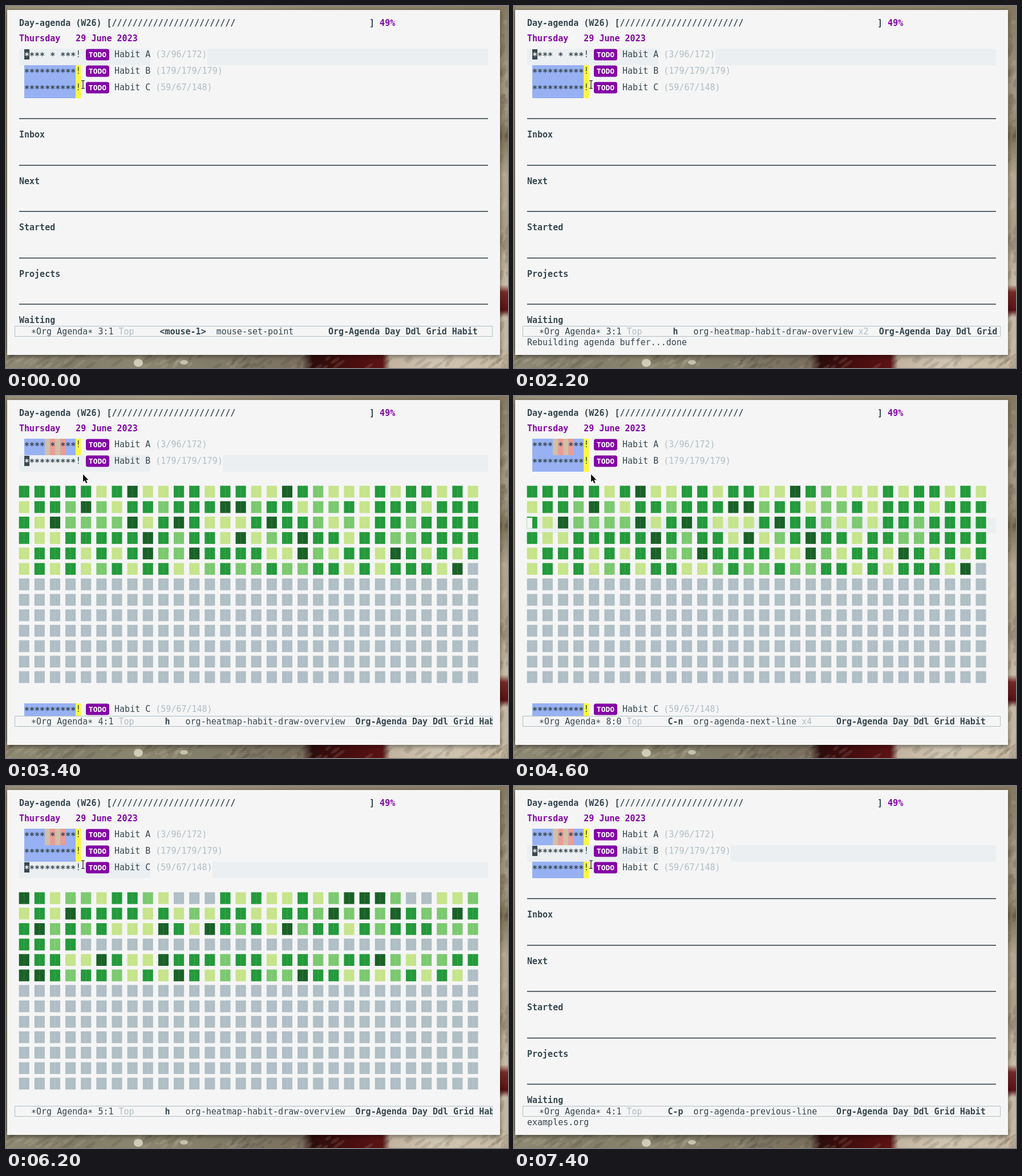
An HTML page with a canvas that plays this animation: 880 by 636 pixels, repeating every 8 s.

```html
<!DOCTYPE html>
<html lang="en">
<head>
<meta charset="utf-8">
<title>Habit heatmap agenda</title>
<style>
html, body { margin: 0; width: 100%; height: 100%; overflow: hidden; }
canvas { display: block; }
</style>
</head>
<body>
<canvas id="stage" width="880" height="636"></canvas>
<script>
const ctx = document.getElementById('stage').getContext('2d');
const LOOP = 8000, CW = 9.03, LEFT = 23;
const INK = '#37474f', FADED = '#b0bec5', PURPLE = '#8305a5', PAPER = '#f5f5f5',
  HILITE = '#ebeff1', BLUE = '#97b1f3', YELLOW = '#f8f83e', TAN = '#d0c0a6', SALMON = '#ec9c96';
const LEVELS = ['#c6e48b', '#7bc96f', '#239a3b', '#196127'];
const HEAT_SHIFT = 407, CELL = 27.13, ROW = 27.15;

// Empty days per habit: [row, first column, last column]
const habits = [
  { name: 'Habit A', stats: '(3/96/172)', stars: '**** * ***', seed: 11,
    gaps: [[1, 23, 23], [3, 15, 17], [5, 4, 4], [5, 23, 23], [5, 25, 25], [5, 29, 29]] },
  { name: 'Habit B', stats: '(179/179/179)', stars: '**********', seed: 29, gaps: [[5, 29, 29]] },
  { name: 'Habit C', stats: '(59/67/148)', stars: '**********', seed: 47,
    gaps: [[0, 10, 12], [0, 25, 26], [3, 4, 29], [5, 29, 29]] }
];

const DRAW = ['h', 'org-heatmap-habit-draw-overview'];
const NEXT = ['C-n', 'org-agenda-next-line'];
const PREV = ['C-p', 'org-agenda-previous-line'];
const CLICK = ['<mouse-1>', 'mouse-set-point'];
const DONE = 'Rebuilding agenda buffer...done', CATEGORY = 'examples.org';

// heat is the index of the habit whose heatmap is open, or -1
const step = (at, line, col, heat, command, count = 1, echo = '') =>
  ({ at, line, col, heat, command, count, echo });
const steps = [
  step(0, 3, 1, -1, CLICK),
  step(1400, 3, 1, 0, DRAW),
  step(2200, 3, 1, -1, DRAW, 2, DONE),
  step(2700, 4, 1, -1, NEXT, 1, CATEGORY),
  step(3400, 4, 1, 1, DRAW),
  step(4000, 5, 0, 1, NEXT),
  step(4100, 6, 0, 1, NEXT, 2),
  step(4400, 7, 0, 1, NEXT, 3),
  step(4600, 8, 0, 1, NEXT, 4),
  step(4700, 9, 0, 1, NEXT, 5),
  step(5100, 4, 1, -1, DRAW),
  step(5200, 4, 1, -1, DRAW, 1, DONE),
  step(5800, 5, 1, -1, NEXT, 1, CATEGORY),
  step(6200, 5, 1, 2, DRAW),
  step(7000, 5, 1, -1, DRAW, 2, DONE),
  step(7400, 4, 1, -1, PREV, 1, CATEGORY)
];

function rect(x, y, w, h, color) {
  ctx.fillStyle = color;
  ctx.fillRect(x, y, w, h);
}

function text(str, x, y, color = INK, weight = 'normal', size = 15) {
  ctx.font = `${weight} ${size}px "DejaVu Sans Mono", monospace`;
  ctx.fillStyle = color;
  ctx.fillText(str, x, y);
}

// Asterisks sit at mid-height, like operators
function stars(str, x, y, color = INK, weight = 'bold') {
  text(str, x, y + 3, color, weight);
}

function gradient(x, y, w, h, vertical, stops) {
  const g = vertical ? ctx.createLinearGradient(0, y, 0, y + h) : ctx.createLinearGradient(x, 0, x + w, 0);
  for (const [pos, color] of stops) g.addColorStop(pos, color);
  rect(x, y, w, h, g);
}

function blob(x, y, rx, ry, color, angle = 0) {
  ctx.fillStyle = color;
  ctx.beginPath();
  ctx.ellipse(x, y, rx, ry, angle, 0, 7);
  ctx.fill();
}

function random(seed) {
  return () => (seed = (seed * 16807) % 2147483647) / 2147483647;
}

function drawDesktop() {
  gradient(0, 0, 880, 14, false, [[0, '#9a917a'], [.3, '#a79d84'], [.6, '#92876f'], [1, '#877b62']]);
  gradient(0, 0, 3, 636, true, [[0, '#8f8770'], [1, '#7c7864']]);
  gradient(860, 0, 20, 636, true, [[0, '#85785f'], [.24, '#a39880'], [.36, '#7d7357'], [.47, '#b5a78f'],
    [.66, '#a99a82'], [.77, '#cabda8'], [.79, '#7a2c28'], [.84, '#5c1015'], [.86, '#c5b9a3'], [1, '#bfb39d']]);
  gradient(0, 606, 880, 30, false, [[0, '#8f8a74'], [.13, '#807c67'], [.26, '#8b866f'], [.45, '#7f7966'],
    [.59, '#7b6f5e'], [.61, '#2c0d0c'], [.67, '#430d0e'], [.75, '#5c1214'], [.765, '#c2b39f'], [.86, '#d0c5b2'], [1, '#c3b69f']]);
  // Loose brush strokes
  const next = random(4242);
  for (let i = 0; i < 160; i++) {
    const tone = next() < .5 ? 'rgba(235,225,200,.12)' : 'rgba(45,35,22,.12)';
    const along = next(), across = next(), size = 4 + next() * 10;
    if (i % 3) blob(along * 880, 612 + across * 24, size, 3, tone, -.6);
    else blob(864 + across * 16, along * 636, 4, size, tone, .3);
  }
  blob(232, 627, 8, 7, '#d1cdb9');
  blob(312, 626, 7, 4, '#c7c2ad');
  ctx.save();
  ctx.shadowColor = 'rgba(0,0,0,.5)';
  ctx.shadowBlur = 8;
  ctx.shadowOffsetY = 2;
  rect(2, 7, 864, 606, PAPER);
  ctx.restore();
}

function drawCursor(x, y, glyph = '') {
  rect(x, y + 1, CW, 18, INK);
  stars(glyph, x, y + 15, PAPER);
}

function drawHabit(habit, y, current) {
  const col = n => LEFT + n * CW;
  const statsX = col(26.5), statsEnd = statsX + habit.stats.length * CW;
  if (current) {
    rect(LEFT, y, 230, 29, HILITE);
    rect(statsEnd, y, 845 - statsEnd, 29, HILITE);
  } else {
    rect(col(1), y, 10 * CW, 29, BLUE);
    rect(col(11), y, CW, 29, YELLOW);
    if (habit === habits[0]) {
      [TAN, SALMON, TAN, SALMON].forEach((color, i) => rect(col(5 + i), y, CW, 29, color));
    }
  }
  stars(habit.stars, col(1), y + 15);
  text('!', col(11), y + 15);
  if (current) drawCursor(col(1), y, '*');
  ctx.fillStyle = PURPLE;
  ctx.beginPath();
  ctx.roundRect(140, y + 0.5, 41, 20, 3.5);
  ctx.fill();
  text('TODO', 144.8, y + 15, '#fff', 'bold', 13);
  text(habit.name, col(18.5), y + 15);
  text(habit.stats, statsX, y + 15, FADED);
}

function drawHeatmap(habit, top, activeRow) {
  const next = random(habit.seed * 7919);
  if (activeRow === -1) {
    rect(LEFT, top - 25, 822, 27, HILITE);
    drawCursor(LEFT, top - 25);
  }
  for (let row = 0; row < 13; row++) {
    const y = top + row * ROW;
    if (row === activeRow) rect(LEFT, y + 2, 822, 27, HILITE);
    for (let c = 0; c < 30; c++) {
      const x = LEFT - .3 + c * CELL, r = next();
      const level = r < .22 ? 0 : r < .42 ? 1 : r < .88 ? 2 : 3;
      const empty = row > 5 || habit.gaps.some(([gr, from, to]) => gr === row && c >= from && c <= to);
      rect(x, y, 18.1, 20.7, empty ? FADED : LEVELS[level]);
      rect(x + 8.6, y, .9, 20.7, 'rgba(255,255,255,.14)');
    }
    if (row === activeRow) rect(LEFT, y + 2, 9, 18.7, PAPER);
  }
}

function drawAgenda(s) {
  text('Day-agenda (W26) [' + '/'.repeat(24), LEFT, 35, INK, 'bold');
  text(']', LEFT + 68 * CW, 35, INK, 'bold');
  text('49%', LEFT + 70 * CW, 35, PURPLE, 'bold');
  text('Thursday   29 June 2023', LEFT, 62, PURPLE, 'bold');

  ctx.save();
  ctx.beginPath();
  ctx.rect(0, 70, 866, 492);
  ctx.clip();
  let y = 75;
  habits.forEach((habit, i) => {
    drawHabit(habit, y, s.line === i + 3 && s.col === 1);
    if (s.heat === i) {
      drawHeatmap(habit, y + 53.7, s.col === 0 ? s.line - i - 5 : -2);
      y += HEAT_SHIFT;
    }
    y += 29;
  });
  ['Inbox', 'Next', 'Started', 'Projects', 'Waiting'].forEach((title, i) => {
    const top = y + 35.3 + i * 81.4;
    rect(LEFT, Math.round(top), 822, 1.6, INK);
    text(title, LEFT, Math.round(top + 34), INK, 'bold');
  });
  ctx.restore();
}

function drawModeLine({ line, col, command: [key, name], count, echo }) {
  ctx.strokeStyle = FADED;
  ctx.lineWidth = 1;
  ctx.strokeRect(15.5, 562.5, 837, 18);
  ctx.save();
  ctx.beginPath();
  ctx.rect(15, 562, 838, 19);
  ctx.clip();
  stars('*          *', 44, 577, INK, 'normal');
  text('Org Agenda', 44 + CW, 577);
  text(`${line}:${col}`, 44 + 13 * CW, 577);
  text('Top', 197.4, 577, FADED);
  const keyWidth = Math.max(3, key.length);
  text(key, 269.4 + (keyWidth - key.length) / 2 * CW, 577, INK, 'bold');
  const nameX = 269.4 + (keyWidth + 2) * CW;
  text(name, nameX, 577);
  let end = nameX + name.length * CW;
  if (count > 1) {
    text('x' + count, end + CW, 577, FADED);
    end += 3 * CW;
  }
  text('Org-Agenda Day Ddl Grid Habit', Math.max(565, end + 2 * CW), 577, INK, 'bold');
  ctx.restore();
  text(echo, LEFT, 596);
}

function drawPointer(arrow) {
  const shape = new Path2D(arrow
    ? 'M135 137.5V151l3-2.8 2.3 5 2.3-1-2.3-4.8h4.3z'
    : 'M132 131h2l1 1 1-1h2M135 132v12M132 145h2l1-1 1 1h2');
  ctx.lineJoin = 'round';
  ctx.strokeStyle = '#fff';
  ctx.lineWidth = arrow ? 2 : 3;
  ctx.stroke(shape);
  if (arrow) {
    ctx.fillStyle = '#111';
    ctx.fill(shape);
  } else {
    ctx.strokeStyle = '#111';
    ctx.lineWidth = 1.2;
    ctx.stroke(shape);
  }
}

function render(now) {
  const t = now % LOOP;
  const state = steps.findLast(s => s.at <= t) || steps[0];
  drawDesktop();
  drawAgenda(state);
  drawModeLine(state);
  drawPointer(state.heat === 1);
  requestAnimationFrame(render);
}
requestAnimationFrame(render);
</script>
</body>
</html>
```
